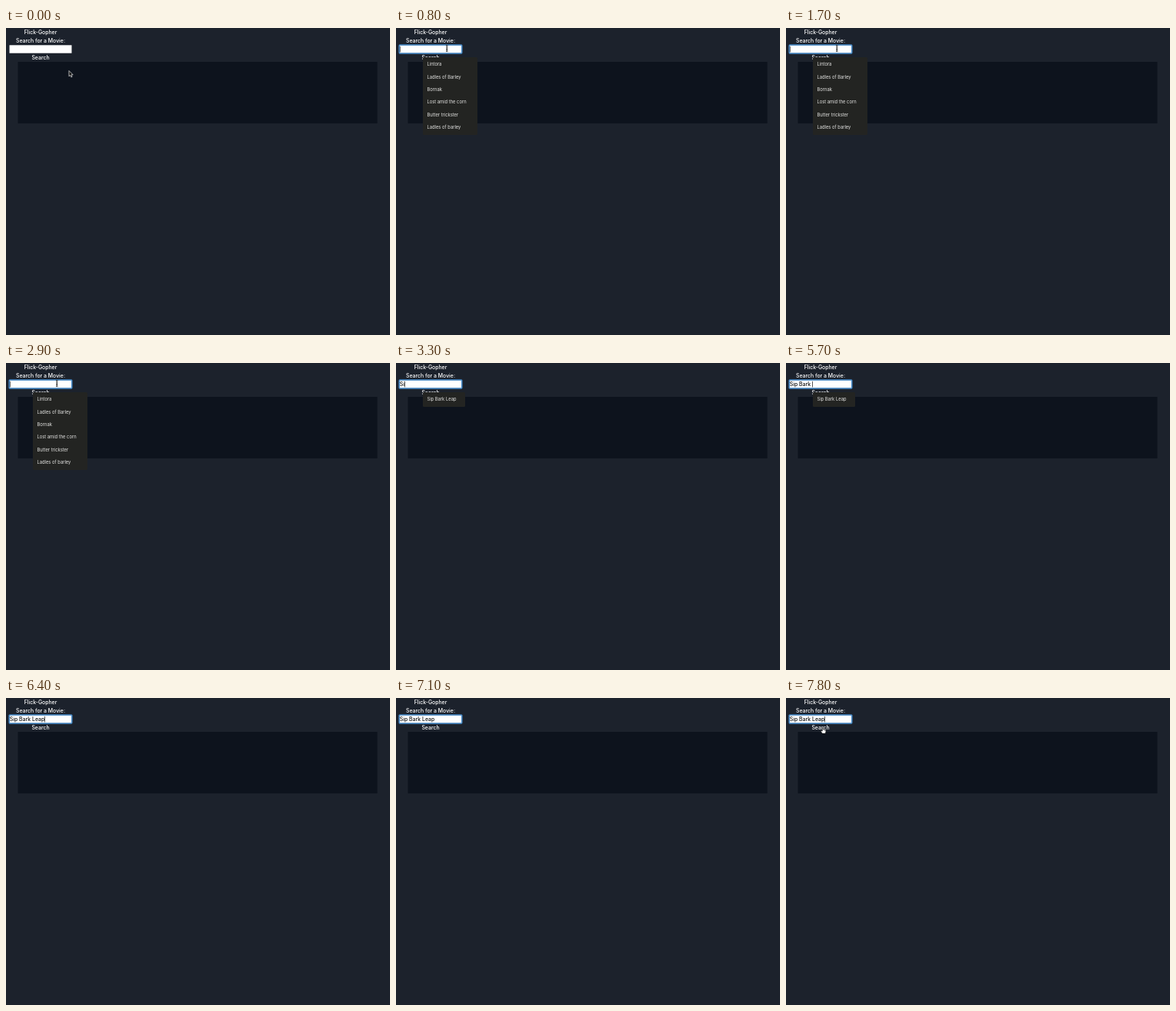
An HTML page that plays this animation: 500x399 px, repeating every 8000 ms.

```html
<!DOCTYPE html>
<html lang="en">
<head>
<meta charset="utf-8">
<title>Movie search</title>
<style>
  html, body { margin: 0; width: 100%; height: 100%; overflow: hidden; background: #1c222c; }
  svg { display: block; width: 500px; height: 399px; }
  text { font: 500 6.9px Inter, "Open Sans", sans-serif; fill: #fff; white-space: pre; }
  .label { text-anchor: middle; }
  #query { fill: #111; }
  #menu text { font-size: 5.8px; font-weight: 400; fill: #e6e6e4; }
</style>
</head>
<body>
<svg viewBox="0 0 500 399">
  <rect width="500" height="399" fill="#1c222c"/>
  <rect x="15.5" y="44" width="468" height="80" fill="#0d131d"/>
  <text class="label" x="45" y="8">Flick-Gopher</text>
  <text class="label" x="45" y="19">Search for a Movie:</text>
  <text class="label" x="45" y="41">Search</text>

  <rect id="field" x="4.5" y="22.3" width="81" height="10.4" fill="#fff"/>
  <rect id="ring" x="4.2" y="22" width="81.6" height="11" rx="1" fill="none" stroke="#4a90d0" stroke-width="1.5"/>
  <text id="query" x="4.8" y="30"></text>
  <rect id="caret" y="23.8" width="0.7" height="7.6" fill="#111"/>

  <g id="menu">
    <rect id="menuBox" x="35" y="38" rx="1.5" fill="#232422"/>
    <g id="items"></g>
  </g>

  <g id="mouse">
    <path id="arrow" d="M0 0V7.3L1.7 5.8L2.9 8.4L4.1 7.9L3 5.3H5.2Z" fill="#111" stroke="#eee" stroke-width="0.7"/>
    <path id="beam" d="M-1.3 -4.2Q0 -4.2 0 -3.2V3.2Q0 4.2 -1.3 4.2M1.3 -4.2Q0 -4.2 0 -3.2V3.2Q0 4.2 1.3 4.2M-.9 1.4H.9" fill="none" stroke="#222" stroke-width="0.8"/>
    <path id="hand" d="M-.7 0Q0 -1 .7 0V2.6L3 3.1Q4.2 3.4 4 4.6L3.3 7.6H-.7L-2.9 4.5Q-2.6 3.3 -.7 4.6Z" fill="#fff" stroke="#111" stroke-width="0.6"/>
  </g>
</svg>
<script>
const LOOP = 8000, FOCUS = 600, FIRST_KEY = 3100, MENU_CLOSE = 6400, MOUSE_BACK = 7300;
const TITLE = "Sip Bark Leap";
const KEY_TIMES = [FIRST_KEY, 3300, 3500, 3800, 4100, 4300, 4400, 4500, 4600, 5800, 6000, 6200, MENU_CLOSE];
const CARET_RESETS = [FOCUS, ...KEY_TIMES, 6500];
const HISTORY = ["Lintora", "Ladles of Barley", "Bornak", "Lost amid the corn", "Butter trickster", "Ladles of barley"];
const ROW = 16.4;

const el = id => document.getElementById(id);
const show = (id, on) => el(id).setAttribute("visibility", on ? "visible" : "hidden");

// Eased position between two points over a time span
function travel(t, start, end, from, to) {
  const p = Math.min(1, Math.max(0, (t - start) / (end - start)));
  const e = p * p * (3 - 2 * p);
  return from.map((v, i) => v + (to[i] - v) * e);
}

let shownItems = "";
function drawMenu(t) {
  const open = t >= FOCUS && t < MENU_CLOSE;
  el("menu").setAttribute("display", open ? "inline" : "none");
  const items = t < FIRST_KEY ? HISTORY : [TITLE];
  if (items.join() === shownItems) return;
  shownItems = items.join();
  el("menuBox").setAttribute("width", items.length > 1 ? 71 : 55);
  el("menuBox").setAttribute("height", 2.5 + ROW * items.length);
  el("items").innerHTML = items.map((name, i) =>
    `<text x="40.5" y="${49.2 + i * ROW}">${name}</text>`).join("");
}

function drawField(t) {
  show("ring", t >= FOCUS);
  const typed = TITLE.slice(0, KEY_TIMES.filter(k => k <= t).length);
  const query = el("query");
  if (query.textContent !== typed) query.textContent = typed;
  const reset = CARET_RESETS.filter(k => k <= t).pop();
  show("caret", reset !== undefined && (t - reset) % 1000 < 500);
  el("caret").setAttribute("x", 4.9 + (typed ? query.getComputedTextLength() : 0));
}

function drawMouse(t) {
  const [x, y] = t < FIRST_KEY
    ? travel(t, 50, 550, [82, 55.5], [66.3, 26.5])
    : travel(t, MOUSE_BACK - 50, 7600, [66.3, 26.5], [48, 38.5]);
  const visible = t < FIRST_KEY || t >= MOUSE_BACK;
  const shape = y < 33 ? "beam" : y < 44 ? "hand" : "arrow";
  el("mouse").setAttribute("transform", `translate(${x} ${y})`);
  for (const id of ["arrow", "beam", "hand"]) show(id, visible && id === shape);
}

function draw(now) {
  const t = now % LOOP;
  drawMenu(t);
  drawField(t);
  drawMouse(t);
}

const start = performance.now();
function tick() {
  draw(performance.now() - start);
  requestAnimationFrame(tick);
}
tick();
</script>
</body>
</html>
```
